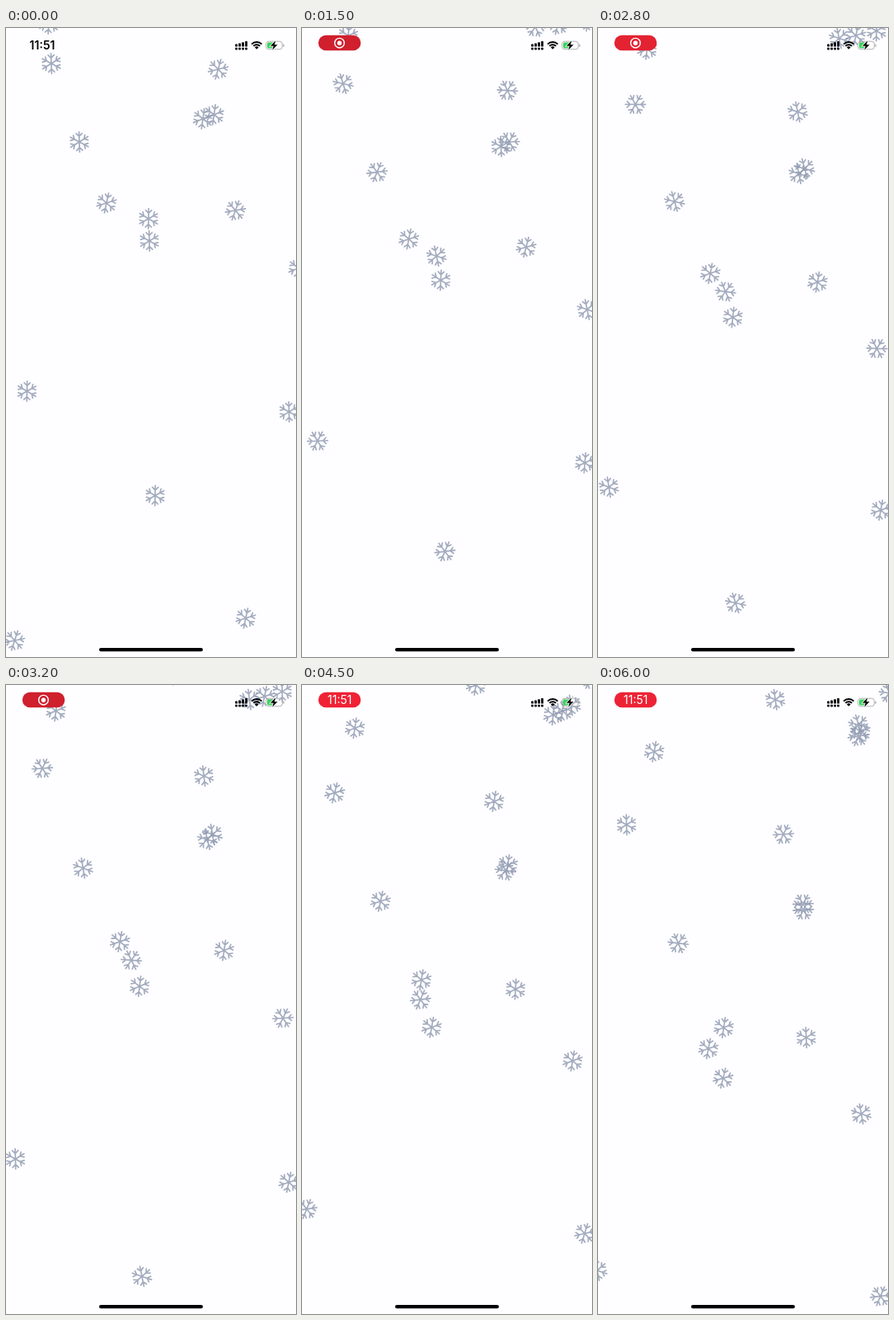
Write an HTML page with a canvas that moves like this. It is 352 by 762 pixels and loops after 6.1 s.

```html
<!DOCTYPE html>
<html lang="en">
<head>
<meta charset="utf-8">
<title>Snowfall</title>
<style>
  html, body { margin: 0; width: 100%; height: 100%; overflow: hidden; background: #fefdff; }
  canvas { display: block; }
</style>
</head>
<body>
<canvas id="stage" width="352" height="762"></canvas>
<script>
const ctx = document.getElementById('stage').getContext('2d');
const LOOP = 6100, STEP = 100;
const TAU = Math.PI * 2;
const GRAVITY = 1.05, SPAWN_Y = -25;

// Start x, start y and sideways drift (px/s), ordered by spin, from left to right.
const starts = [
  [355, 291, -5.9], [199, -24.8, 2.7], [55, 43, -3.4], [173, 231, -6.5],
  [239, 110, 1.7], [357, -18, -6.8], [278.5, 221, -4.3], [308, -15, 1.8],
  [122, 212, 5.1], [52, -5, 2.7], [174, 258, -3.7], [343.5, 465, -0.1],
  [341, -28, 2.1], [291, 715, -3], [10.5, 742, -1], [272.5, -13, 7.2],
  [257.5, 50, -5.4], [252.5, 105, -0.6], [181, 566.5, -5], [89, 138, 1.4],
  [25.5, 440, -4.4]
];

const flakes = starts.map(([x, y, drift], i) => ({
  x, y, drift,
  // The further a flake has fallen, the faster it already is.
  fall: Math.sqrt(3.2 * Math.max(0, y - SPAWN_Y)),
  tilt: 9 - 11 * Math.cos((i - 2) / 8.5 * TAU),
  spin: -13 + 31 * i / (starts.length - 1)
}));

function makeFlake() {
  const path = new Path2D();
  for (let i = 0; i < 6; i++) {
    const a = i * TAU / 6;
    const at = (r, side) => [
      r * Math.sin(a) + side * Math.cos(a),
      -r * Math.cos(a) + side * Math.sin(a)
    ];
    path.moveTo(0, 0);
    path.lineTo(...at(12.3, 0));
    path.moveTo(...at(10.2, -3.6));
    path.lineTo(...at(6.6, 0));
    path.lineTo(...at(10.2, 3.6));
  }
  return path;
}
const flakePath = makeFlake();

function drawFlake(flake, t) {
  ctx.save();
  ctx.translate(flake.x + flake.drift * t, flake.y + flake.fall * t + GRAVITY * t * t);
  ctx.rotate((flake.tilt + flake.spin * t) / 360 * TAU);
  ctx.strokeStyle = 'rgba(146, 156, 179, 0.85)';
  ctx.lineWidth = 1.65;
  ctx.lineCap = 'round';
  ctx.stroke(flakePath);
  ctx.restore();
}

function box(x, y, w, h, r, color) {
  ctx.beginPath();
  ctx.roundRect(x, y, w, h, r);
  ctx.fillStyle = color;
  ctx.fill();
}

function clock(x, y, weight, color) {
  ctx.font = `${weight} 14px Inter, sans-serif`;
  ctx.textAlign = 'center';
  ctx.fillStyle = color;
  ctx.fillText('11:51', x, y);
}

function drawRecorder(t) {
  if (t < 0.7) return clock(44, 26, 600, '#000');
  const glow = 0.5 + 0.5 * Math.cos((t - 2.35) / 1.95 * TAU);
  const mix = (lo, hi) => Math.round(lo + (hi - lo) * glow);
  box(19.8, 8.8, 51.6, 18.4, 9.2, `rgb(${mix(207, 243)}, ${mix(31, 36)}, ${mix(45, 54)})`);
  if (t >= 3.9) return clock(45.7, 23, 400, '#fff');
  ctx.beginPath();
  ctx.arc(45.5, 18.2, 5.8, 0, TAU);
  ctx.strokeStyle = '#fff';
  ctx.lineWidth = 1.4;
  ctx.stroke();
  ctx.beginPath();
  ctx.arc(45.5, 18.2, 2.7, 0, TAU);
  ctx.fillStyle = '#fff';
  ctx.fill();
}

function drawSignal() {
  for (let i = 0; i < 4; i++) {
    const x = 278.2 + i * 4, h = 3 + i * 1.2;
    box(x, 22.6 - h, 2.8, h, 0.7, '#000');
    box(x, 23.7, 2.8, 2.7, 0.7, '#000');
  }
}

function drawWifi() {
  const cx = 304.3, cy = 25.8, from = -TAU * 3 / 8, to = -TAU / 8;
  ctx.strokeStyle = ctx.fillStyle = '#000';
  ctx.lineWidth = 2;
  ctx.lineCap = 'butt';
  for (const r of [8.7, 5.5]) {
    ctx.beginPath();
    ctx.arc(cx, cy, r, from, to);
    ctx.stroke();
  }
  ctx.beginPath();
  ctx.moveTo(cx, cy);
  ctx.arc(cx, cy, 3.3, from, to);
  ctx.fill();
}

function drawBattery() {
  ctx.beginPath();
  ctx.roundRect(315.7, 16.2, 19.6, 9.6, 3);
  ctx.strokeStyle = '#a9a9ab';
  ctx.lineWidth = 0.9;
  ctx.stroke();
  box(336.3, 19.4, 1.3, 3.4, 0.7, '#a9a9ab');
  box(317, 17.5, 8.5, 7, 1.7, '#3bd45c');
  const bolt = new Path2D('M327.3 15.2 L321 21.7 H324.7 L323.2 26.8 L329.6 20.2 H325.8 Z');
  ctx.strokeStyle = '#fefdff';
  ctx.lineWidth = 1.5;
  ctx.stroke(bolt);
  ctx.fillStyle = '#000';
  ctx.fill(bolt);
}

function draw(t) {
  ctx.fillStyle = '#fefdff';
  ctx.fillRect(0, 0, 352, 762);
  for (const flake of flakes) drawFlake(flake, t);
  drawRecorder(t);
  drawSignal();
  drawWifi();
  drawBattery();
  box(113, 750.9, 126, 4.4, 2.2, '#000');
}

const start = performance.now();
function tick() {
  const ms = (performance.now() - start) % LOOP;
  draw(Math.floor(ms / STEP) * STEP / 1000);
  requestAnimationFrame(tick);
}
tick();
</script>
</body>
</html>
```
